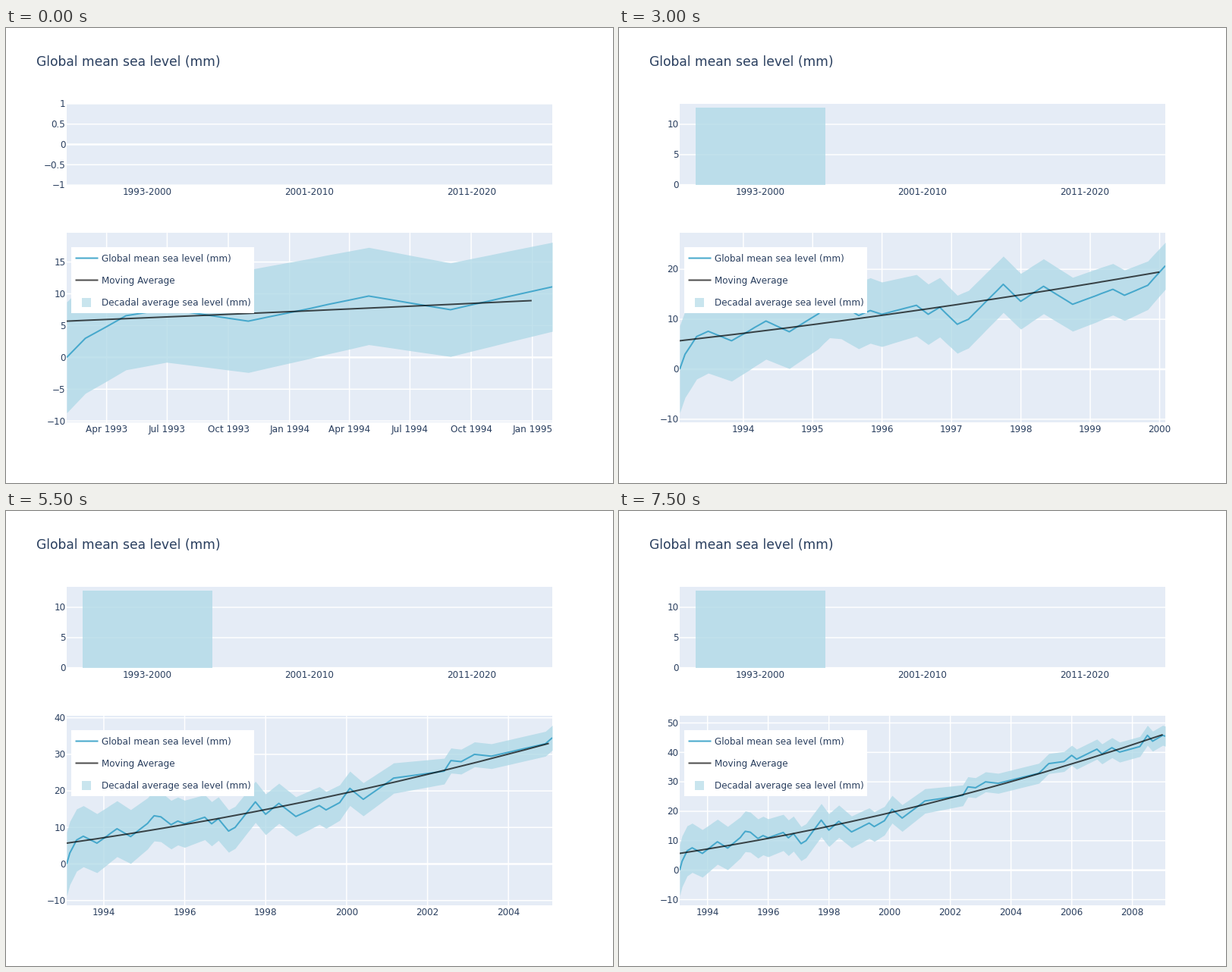
Recreate the animation shown at these times as a matplotlib script. Size 800x600 px, loop 8 s.

```python
import matplotlib.pyplot as plt
import numpy as np
from matplotlib.animation import FuncAnimation
from matplotlib.patches import Rectangle

plt.rcParams["font.family"] = "DejaVu Sans"
PT = 0.72  # points per pixel at 100 dpi
INK, PANEL, BAND, BLUE = "#2a3f5f", "#e5ecf6", "#add8e6", "#46a8cc"
LEFT, RIGHT = 80, 720
TOP_PANEL, LOW_PANEL = (100, 207.1), (270.1, 520)
START = np.datetime64("1993-01-31")

# Turning points of the sea level and of the band's half width: (month, mm).
TURNS = [
    (0, 0), (1, 3), (3, 6.55), (5, 7.6), (9, 5.7), (15, 9.65), (19, 7.5),
    (24, 11.1), (26, 13.2), (28, 12.9), (31, 10.75), (33, 11.75), (35, 11),
    (41, 12.8), (43, 11), (45, 12.4), (48, 9), (50, 10), (56, 17),
    (59, 13.6), (63, 16.6), (68, 13), (75, 16), (77, 14.8), (81, 16.8),
    (84, 20.7), (88, 17.7), (97, 23.5), (112, 25.4), (114, 28.3),
    (117, 28), (121, 30), (126, 29.5), (142, 32.9), (146, 36.2),
    (152, 36.9), (155, 39), (157, 37.7), (165, 41.1), (167, 39.5),
    (171, 41.6), (174, 40.1), (182, 42), (185, 45.8), (187, 43.8),
    (191, 45.8), (192, 45.5),
]
SPREAD = [(0, 8.72), (24, 7), (48, 5.8), (72, 5.3), (84, 4.7), (115, 3.4)]

months = np.arange(193)
level = np.interp(months, *zip(*TURNS))
spread = np.interp(months, *zip(*SPREAD))
trend = 5.7 + 1.57 * (months / 12) + 0.0605 * (months / 12) ** 2


def days_since_start(date):
    return (date.astype("M8[D]") - START).astype(float)


month_end = days_since_start(np.datetime64("1993-02") + months) - 1

fig = plt.figure(figsize=(8, 6), dpi=100, facecolor="white")
ax = fig.add_axes([0, 0, 1, 1])


def text(x, baseline, label, size=12, ha="left"):
    ax.text(x, baseline, label, size=size * PT, color=INK, ha=ha,
            va="baseline", zorder=6)


def line(x, y, color, width, zorder, alpha=1, clip=None):
    artist, = ax.plot(x, y, color=color, lw=width * PT, alpha=alpha,
                      zorder=zorder, solid_capstyle="butt",
                      solid_joinstyle="round", snap=False)
    if clip:
        artist.set_clip_path(clip)


def box(x0, y0, x1, y1, color, zorder, alpha=1):
    patch = Rectangle((x0, y0), x1 - x0, y1 - y0, fc=color, lw=0,
                      alpha=alpha, zorder=zorder)
    return ax.add_patch(patch)


def y_axis(values, to_y, clip):
    for v in values:
        y = to_y(v)
        line([LEFT, RIGHT], [y, y], "white", 1.5 if v else 2.5, 1, clip=clip)
        text(78.5, y + 4.3, f"{v:g}".replace("-", "\u2212"), ha="right")


def draw_decades(show_bar):
    top, bottom = TOP_PANEL
    panel = box(LEFT, top, RIGHT, bottom, PANEL, 0)
    if show_bar:
        y_axis([0, 5, 10], lambda v: bottom - 8.01 * v, panel)
        box(101.33, 105.4, 272, bottom, BAND, 2, 0.75)
    else:
        middle, half = (top + bottom) / 2, (bottom - top) / 2
        y_axis([-1, -0.5, 0, 0.5, 1], lambda v: middle - half * v, panel)
    for k, label in enumerate(["1993-2000", "2001-2010", "2011-2020"]):
        text(LEFT + 640 * (k + 0.5) / 3, 220, label, ha="center")


def draw_series(years):
    top, bottom = LOW_PANEL
    n = 12 * years + 1
    panel = box(LEFT, top, RIGHT, bottom, PANEL, 0)
    low, high = (level - spread)[:n], (level + spread)[:n]
    span = (high.max() - low.min()) / 0.9
    floor = low.min() - 0.05 * span

    def to_x(days):
        return LEFT + 640 * days / month_end[n - 1]

    def to_y(v):
        return bottom - (bottom - top) * (v - floor) / span

    # Date ticks widen from quarters to two years as the range grows.
    step = next(s for s in (3, 6, 12, 24) if years * 12 / 9 <= s)
    for date in np.arange("1992-01", "2010-01", step, dtype="M8[M]"):
        x = to_x(days_since_start(date))
        if LEFT <= x <= RIGHT:
            line([x, x], [top, bottom], "white", 1.5, 1, clip=panel)
            pattern = "%b %Y" if step < 12 else "%Y"
            text(x, 533, date.item().strftime(pattern), ha="center")

    gap = 5 if span / 7.25 <= 5 else 10
    first = int(np.ceil(floor / gap)) * gap
    y_axis(np.arange(first, floor + span, gap), to_y, panel)

    x = to_x(month_end[:n])
    ax.fill_between(x, to_y(low), to_y(high), color=BAND, alpha=0.75, lw=0,
                    zorder=2)
    line(x, to_y(level[:n]), BLUE, 2, 3, clip=panel)
    line(x[:-1], to_y(trend[:n - 1]), "black", 2, 4, 0.7, panel)


def draw_legend():
    box(86, 289.3, 327, 376.2, "white", 5)
    line([91.5, 121.5], [303.5, 303.5], BLUE, 2, 6)
    line([91.5, 121.5], [332.5, 332.5], "black", 2, 6, 0.7)
    box(100, 355.5, 112, 367.5, BAND, 6, 0.65)
    labels = ["Global mean sea level (mm)", "Moving Average",
              "Decadal average sea level (mm)"]
    for row, label in enumerate(labels):
        text(126, 308 + 29 * row, label)


def draw(frame):
    ax.cla()
    ax.set(xlim=(0, 800), ylim=(600, 0))
    ax.axis("off")
    years = max(frame, 1) + 1  # the opening two years are held for two steps
    text(40, 50, "Global mean sea level (mm)", 17.15)
    draw_decades(years >= 7)
    draw_series(years)
    draw_legend()


animation = FuncAnimation(fig, draw, frames=16, interval=500, repeat=True,
                          repeat_delay=0, init_func=lambda: None)
plt.show()
```
